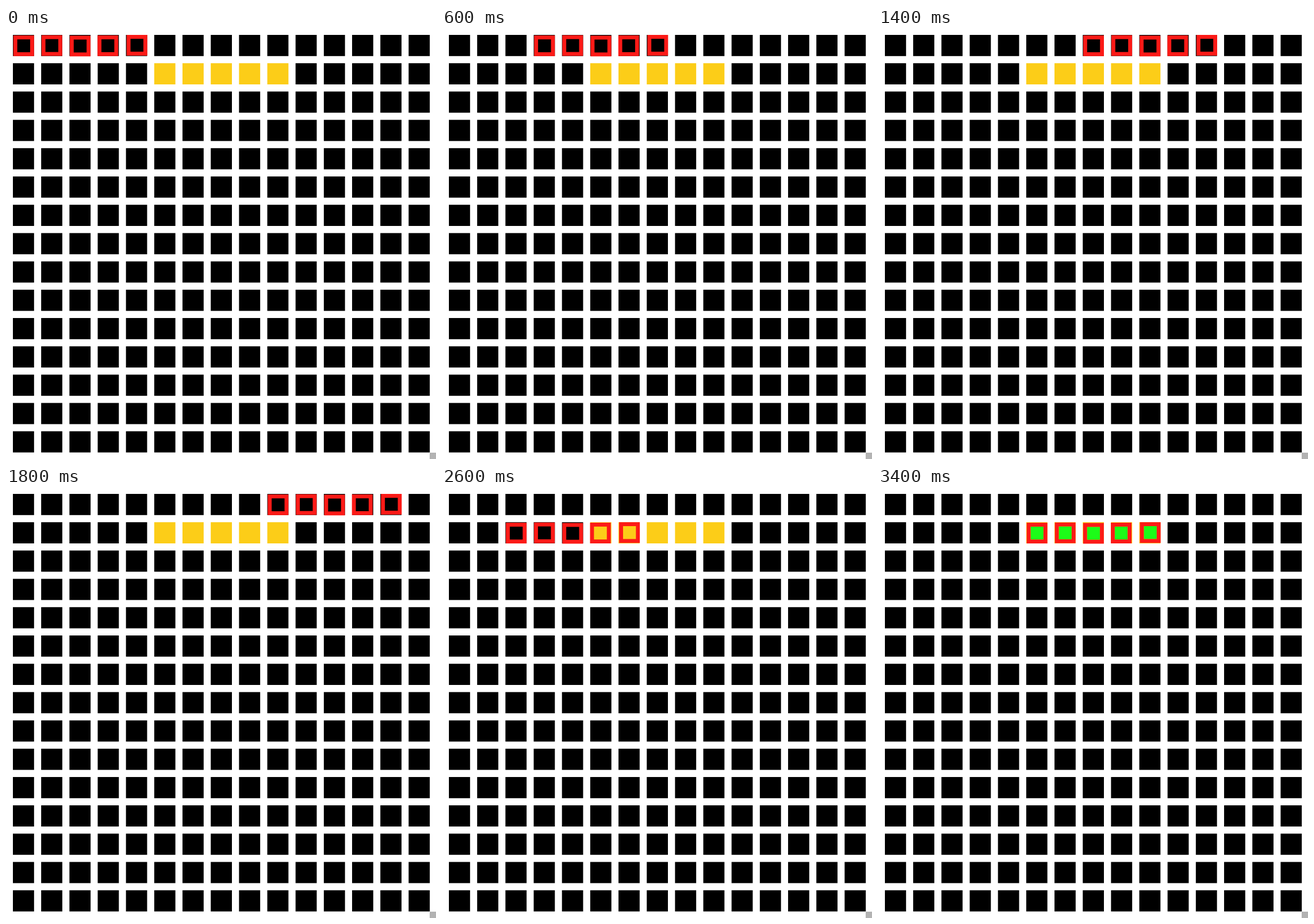
Write an HTML page with a canvas that moves like this. It is 748x749 px and loops after 4400 ms.

```html
<!DOCTYPE html>
<html lang="en">
<head>
<meta charset="utf-8">
<title>Sliding window</title>
<style>
  html, body { margin: 0; width: 100%; height: 100%; overflow: hidden; background: #fff; }
  canvas { display: block; }
</style>
</head>
<body>
<canvas id="stage" width="748" height="749"></canvas>
<script>
const ctx = document.getElementById('stage').getContext('2d');

const LOOP = 4400, STEP = 200, FOUND_AT = 3400;
const GRID = 15, CELL = 36.8, ORIGIN = 12, PITCH_X = 49.17, PITCH_Y = 49.2;
const POSITIONS = 11;            // window positions per row
const TARGET = { row: 1, col: 5, len: 5 };
const HOLE = 22.4, RING = 6.8;
// Hand-placed ring centres, relative to the window's first cell
const RINGS = [[18.8, 18.9], [67.8, 18.5], [117, 19.3], [165.2, 18.8], [215.8, 18]];

const cellX = col => ORIGIN + col * PITCH_X;
const cellY = row => ORIGIN + row * PITCH_Y;

function rect(x, y, w, h, color) {
  ctx.fillStyle = color;
  ctx.fillRect(x, y, w, h);
}

function drawGrid() {
  for (let row = 0; row < GRID; row++) {
    for (let col = 0; col < GRID; col++) {
      const hit = row === TARGET.row && col >= TARGET.col && col < TARGET.col + TARGET.len;
      rect(cellX(col), cellY(row), CELL, CELL, hit ? '#fccd18' : '#000');
    }
  }
  rect(737, 738, 11, 11, '#b3b3b3');
}

function drawWindow(row, col, found) {
  const side = HOLE + RING;
  ctx.strokeStyle = '#fc1a17';
  ctx.lineWidth = RING;
  for (const [dx, dy] of RINGS) {
    const x = cellX(col) + dx, y = cellY(row) + dy;
    if (found) rect(x - HOLE / 2, y - HOLE / 2, HOLE, HOLE, '#1cfc18');
    ctx.strokeRect(x - side / 2, y - side / 2, side, side);
  }
}

function render(t) {
  const last = TARGET.row * POSITIONS + TARGET.col;
  const step = Math.min(Math.floor(t / STEP), last);
  rect(0, 0, 748, 749, '#fff');
  drawGrid();
  drawWindow(Math.floor(step / POSITIONS), step % POSITIONS, t >= FOUND_AT);
}

const start = performance.now();
function tick() {
  render((performance.now() - start) % LOOP);
  requestAnimationFrame(tick);
}
tick();
</script>
</body>
</html>
```
